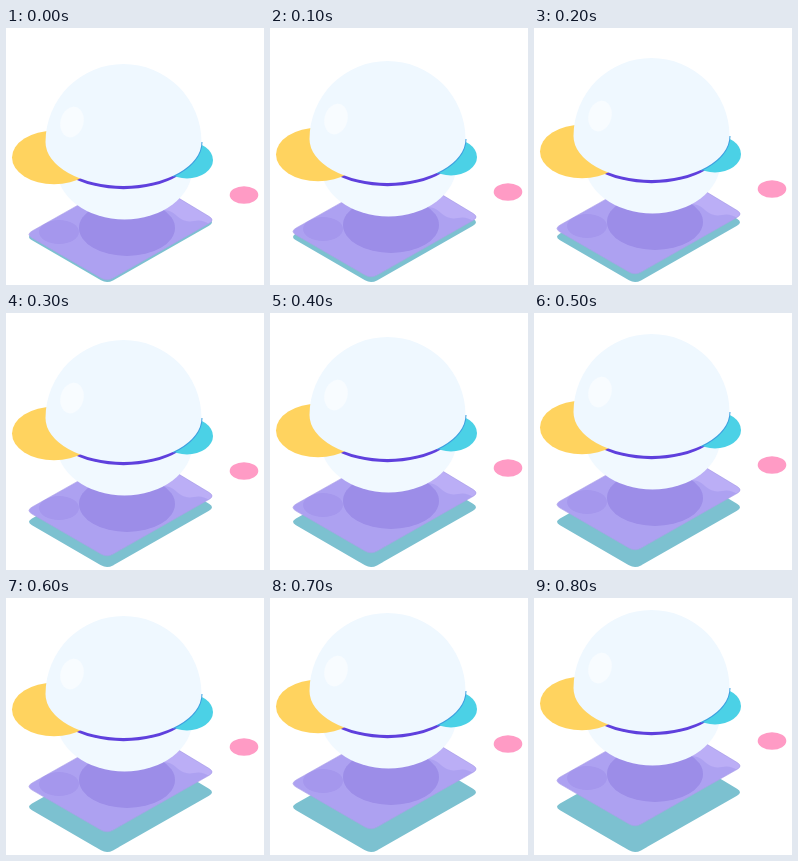
Animation of 258 by 257 pixels, one loop 900 ms. Source, as an HTML page:

```html
<!DOCTYPE html>
<html lang="en">
<head>
<meta charset="utf-8">
<title>Floating sphere</title>
<style>
  html, body { margin: 0; width: 100%; height: 100%; overflow: hidden; background: #fff; }
  svg { display: block; width: 100vw; height: 100vh; }
</style>
</head>
<body>
<svg viewBox="0 0 258 257">
  <defs>
    <path id="slab" d="M26 203.100 L124 147.900 Q130 144.500 136 148.100 L203 188.400 Q209 192 203 195.400 L107 250.100 Q101 253.500 95 250 L26 210 Q20 206.500 26 203.100Z"/>
    <clipPath id="inside"><use href="#slab"/></clipPath>
  </defs>

  <use href="#slab" y="2.300" fill="#7cc1d0"/>

  <g id="rising">
    <g clip-path="url(#inside)">
      <use href="#slab" fill="#ada1f1"/>
      <path d="M130 140 L212 190 L203 196 Q196 191 188 193 Q178 195 171 188 Q163 180 148 182Z" fill="#bbaef6"/>
      <ellipse cx="53" cy="204" rx="20" ry="12" fill="#a597ed"/>
      <ellipse cx="121" cy="200" rx="48" ry="28" fill="#9c8de8"/>
    </g>
    <use href="#slab" fill="none" stroke="#aba0ea" stroke-width=".7"/>

    <ellipse cx="118.500" cy="140" rx="68" ry="51.500" fill="#f1f9ff"/>
    <path d="M39.500 114 A78 47.200 0 0 0 195.500 114Z" fill="#5f40dd"/>
    <ellipse cx="181" cy="132" rx="26" ry="18.500" fill="#4bd1e6"/>
    <ellipse cx="48" cy="129.500" rx="42" ry="26.800" fill="#ffd35f"/>
    <path d="M195.500 114 A78 43.900 0 0 1 167 148" fill="none" stroke="#3e9fe0" stroke-width="2"/>
    <path d="M39.500 114 A78 78 0 0 1 195.500 114 A78 43.900 0 0 1 39.500 114Z" fill="#eff8ff"/>
    <ellipse cx="66" cy="94" rx="11.500" ry="15.500" transform="rotate(14 66 94)" fill="#f8fcff"/>
    <ellipse cx="238" cy="167" rx="14.300" ry="8.700" fill="#ff9bc5"/>
  </g>
</svg>
<script>
  const LOOP = 900, STEP = 100, RISE = 3;
  const rising = document.getElementById('rising');
  const start = performance.now();

  // The group climbs in equal hard steps, then drops back.
  function draw(now) {
    const time = Math.max(0, now - start) % LOOP;
    rising.setAttribute('transform', `translate(0 ${-RISE * Math.floor(time / STEP)})`);
    requestAnimationFrame(draw);
  }
  draw(start);
</script>
</body>
</html>
```
